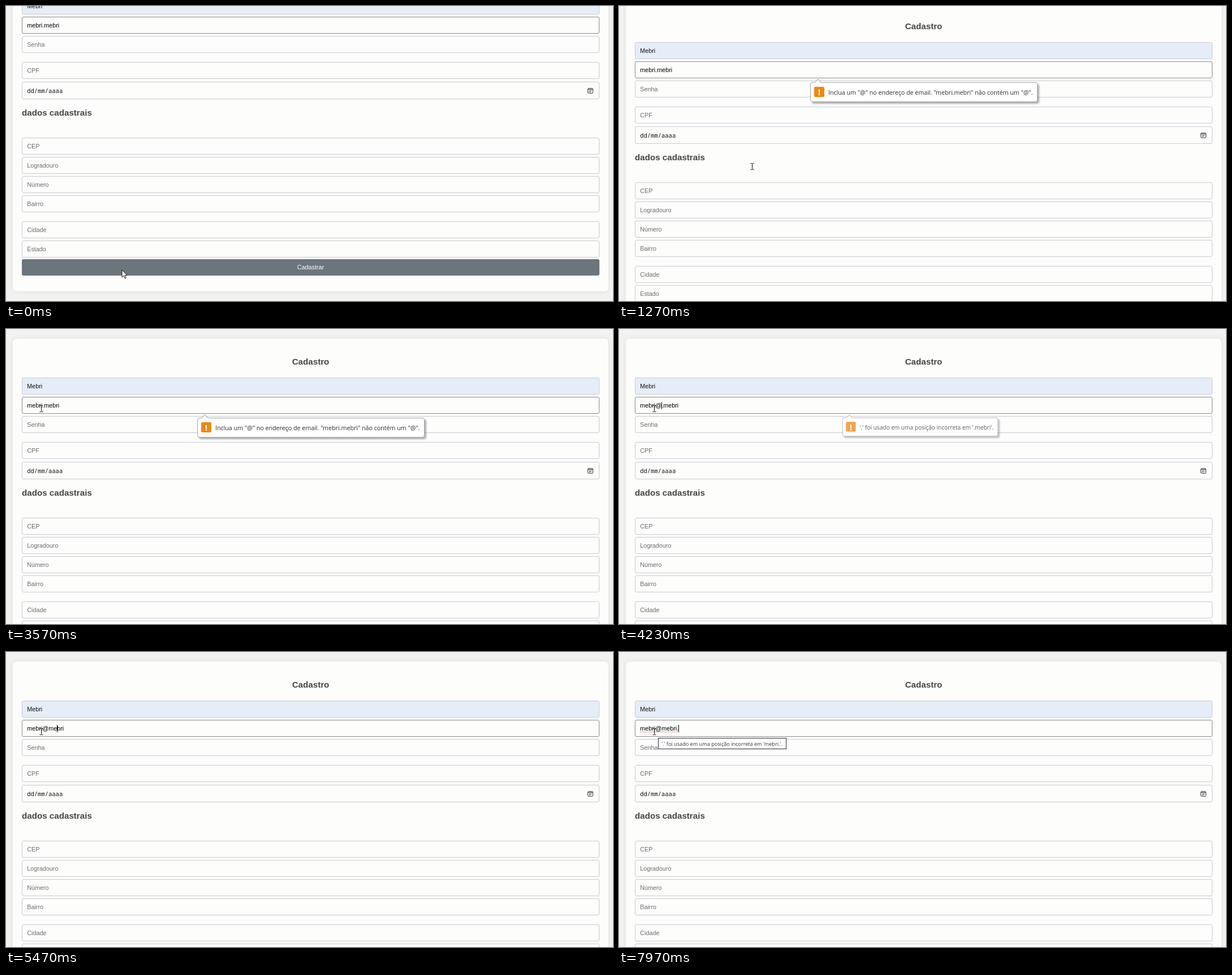
Write an HTML page that moves like this. It is 1073x522 px and loops after 8000 ms.

```html
<!DOCTYPE html>
<html lang="pt-BR">
<head>
<meta charset="utf-8">
<title>Cadastro</title>
<style>
  :root { --loop: 8s; }
  html, body { margin: 0; width: 100%; height: 100%; overflow: hidden; background: #f2f2f0; }
  #stage {
    position: relative; width: 1073px; height: 522px; overflow: hidden; background: #f2f2f0;
    font: 10.8px "Liberation Sans", Arial, sans-serif;
  }
  #stage div, #stage svg { position: absolute; box-sizing: border-box; white-space: nowrap; }

  #page { left: 0; top: 0; width: 1073px; height: 623px; animation: scroll var(--loop) infinite ease-in-out; }
  #card {
    left: 12px; top: 17px; width: 1053px; height: 589px; border-radius: 7px;
    background: #fdfdfc; box-shadow: 0 0 8px rgba(0, 0, 0, .08);
  }
  .title { height: 20px; line-height: 20px; font-size: 15.16px; font-weight: bold; color: #464644; }
  .field {
    left: 28px; width: 1021px; height: 30px; line-height: 28px; padding-left: 8.2px;
    border: 1px solid #cacad0; border-radius: 3px; color: #6c6c6a;
  }
  .field.filled { background: #e5edf9; color: #111; }
  .field.focus { border-color: #8a8a8c; color: #000; }
  .field.date { height: 31px; color: #111; font: 10.5px/30px "Noto Sans Mono", "DejaVu Sans Mono", monospace; }
  .button {
    left: 28px; top: 549px; width: 1021px; height: 29px; line-height: 28px; border-radius: 3px;
    background: #6b767c; color: #fff; text-align: center;
  }
  #caret { display: inline-block; width: 1px; height: 13px; margin-right: -1px; vertical-align: -3px; background: #000; }
  .typo { text-decoration: underline dotted #d8473f 1px; text-underline-offset: 1.5px; }

  .bubble {
    top: 157px; height: 35px; padding: 0 7px 0 31px; line-height: 34px;
    border: 1px solid #a2a2a2; border-radius: 4px; background: #fff; color: #2c2c2c;
    font-family: "Open Sans", "Noto Sans", sans-serif; font-size: 10.68px;
    box-shadow: 3px 3px 3px rgba(0, 0, 0, .3); transform-origin: 13px -6px;
    animation: var(--loop) infinite cubic-bezier(.4, 0, .2, 1);
  }
  .bubble::before {
    content: ""; position: absolute; left: 8px; top: -5px; width: 8px; height: 8px;
    border: solid #a2a2a2; border-width: 1px 0 0 1px; background: #fff; transform: rotate(45deg);
  }
  .bubble::after {
    content: "!"; position: absolute; left: 6px; top: 7px; width: 18px; height: 18px; border-radius: 2px;
    background: #ee8811; color: #fff; text-align: center; font: bold 15px/18px "Open Sans", sans-serif;
  }
  #missing { left: 338px; animation-name: missing; }
  #misplaced { left: 394px; font-size: 10.6px; animation-name: misplaced; }
  .tip {
    left: 69px; top: 152px; height: 20px; padding: 0 6px 0 5px; line-height: 19px;
    border: 1px solid #2c2c36; background: #fff; color: #333;
    font-family: "Open Sans", "Noto Sans", sans-serif; font-size: 9.14px;
    animation: var(--loop) infinite step-end;
  }
  #tipA { animation-name: tipA; }
  #tipB { animation-name: tipB; }

  #pointer { left: 0; top: 0; animation: travel var(--loop) infinite ease-in-out; }
  #arrow { left: -1px; top: -1px; animation: arrow var(--loop) infinite step-end; }
  #beam { left: -4px; top: -7px; animation: beam var(--loop) infinite step-end; }

  @keyframes scroll {
    0%, 12% { transform: translateY(-101px); }
    17.75%, 100% { transform: none; }
  }
  @keyframes missing {
    0%, 6% { opacity: 0; transform: scale(.8); }
    11.84%, 49.37% { opacity: 1; transform: none; }
    49.38%, 100% { opacity: 0; transform: none; }
  }
  @keyframes misplaced {
    0%, 50% { opacity: 0; transform: scale(.8); }
    55.84%, 63.75% { opacity: 1; transform: none; }
    65%, 100% { opacity: 0; transform: none; }
  }
  @keyframes tipA { 0% { opacity: 0; } 53.75% { opacity: 1; } 63.75%, 100% { opacity: 0; } }
  @keyframes tipB { 0% { opacity: 0; } 83.75%, 100% { opacity: 1; } }
  @keyframes travel {
    0%, 3% { transform: translate(205px, 467px); }
    9.5%, 18% { transform: translate(235px, 284px); }
    23%, 30% { transform: translate(71px, 136px); }
    34%, 100% { transform: translate(62px, 141px); }
  }
  @keyframes arrow { 0% { opacity: 1; } 4.7%, 100% { opacity: 0; } }
  @keyframes beam { 0% { opacity: 0; } 4.7%, 100% { opacity: 1; } }
</style>
</head>
<body>
<div id="stage">
  <div id="page">
    <div id="card"></div>
    <div class="title" style="left:0; width:1077px; top:48px; text-align:center">Cadastro</div>
    <div class="field filled" style="top:86px">Mebri</div>
    <div class="field focus" style="top:120px"><span id="before">mebri.mebri</span><i id="caret"></i><span id="after"></span></div>
    <div class="field" style="top:154px">Senha</div>
    <div class="field" style="top:200px">CPF</div>
    <div class="field date" style="top:235px">dd/mm/aaaa
      <svg style="left:999px; top:10px" width="10" height="10" fill="none" stroke="#333">
        <rect x=".5" y=".8" width="9" height="8.5" rx="1.5"/>
        <path d="M1 2.5h8M2.5 5h5M2.5 7h3"/>
      </svg>
    </div>
    <div class="title" style="left:28px; top:280px">dados cadastrais</div>
    <div class="field" style="top:334px">CEP</div>
    <div class="field" style="top:368px">Logradouro</div>
    <div class="field" style="top:402px">Número</div>
    <div class="field" style="top:436px">Bairro</div>
    <div class="field" style="top:482px">Cidade</div>
    <div class="field" style="top:516px">Estado</div>
    <div class="button">Cadastrar</div>
    <div class="bubble" id="missing">Inclua um "@" no endereço de email. "mebri.mebri" não contém um "@".</div>
    <div class="bubble" id="misplaced">'.' foi usado em uma posição incorreta em '.mebri'.</div>
    <div class="tip" id="tipA">'.' foi usado em uma posição incorreta em '.mebri'.</div>
    <div class="tip" id="tipB">'.' foi usado em uma posição incorreta em 'mebri.'.</div>
  </div>
  <div id="pointer">
    <svg id="arrow" width="13" height="19">
      <path d="M1 1v13l3-2.8 2.2 4.8 2-.9L6 10.5h4z" fill="#fff" stroke="#111"/>
    </svg>
    <svg id="beam" width="9" height="14" fill="none" stroke="#111">
      <path d="M1.5 1.5h2l1 .5 1-.5h2M4.5 2v10M1.5 12.5h2l1-.5 1 .5h2"/>
    </svg>
  </div>
</div>
<script>
  const LOOP = 8000, BLINK = 530, TYPO_AT = 6700;
  // [time, text, caret index]; each step restarts the caret blink
  const steps = [
    [480, "mebri.mebri", 11],
    [2950, "mebri.mebri", 5],
    [3950, "mebri@.mebri", 6],
    [5100, "mebri@mebri", 6],
    [5240, "mebri@mebri", 7],
    [5380, "mebri@mebri", 8],
    [5560, "mebri@mebri", 9],
    [5700, "mebri@mebri", 10],
    [5840, "mebri@mebri", 11],
    [6400, "mebri@mebri.", 12],
  ];
  const [before, caret, after] = ["before", "caret", "after"].map(id => document.getElementById(id));
  let start;

  function draw(now) {
    start ??= now;
    const t = (now - start) % LOOP;
    const [time, text, index] = steps.findLast(s => s[0] <= t) ?? steps[0];
    before.textContent = text.slice(0, index);
    after.textContent = text.slice(index);
    before.classList.toggle("typo", t >= TYPO_AT);
    const lit = t >= time && Math.floor((t - time) / BLINK) % 2 === 0;
    caret.style.opacity = lit ? 1 : 0;
    requestAnimationFrame(draw);
  }
  requestAnimationFrame(draw);
</script>
</body>
</html>
```
